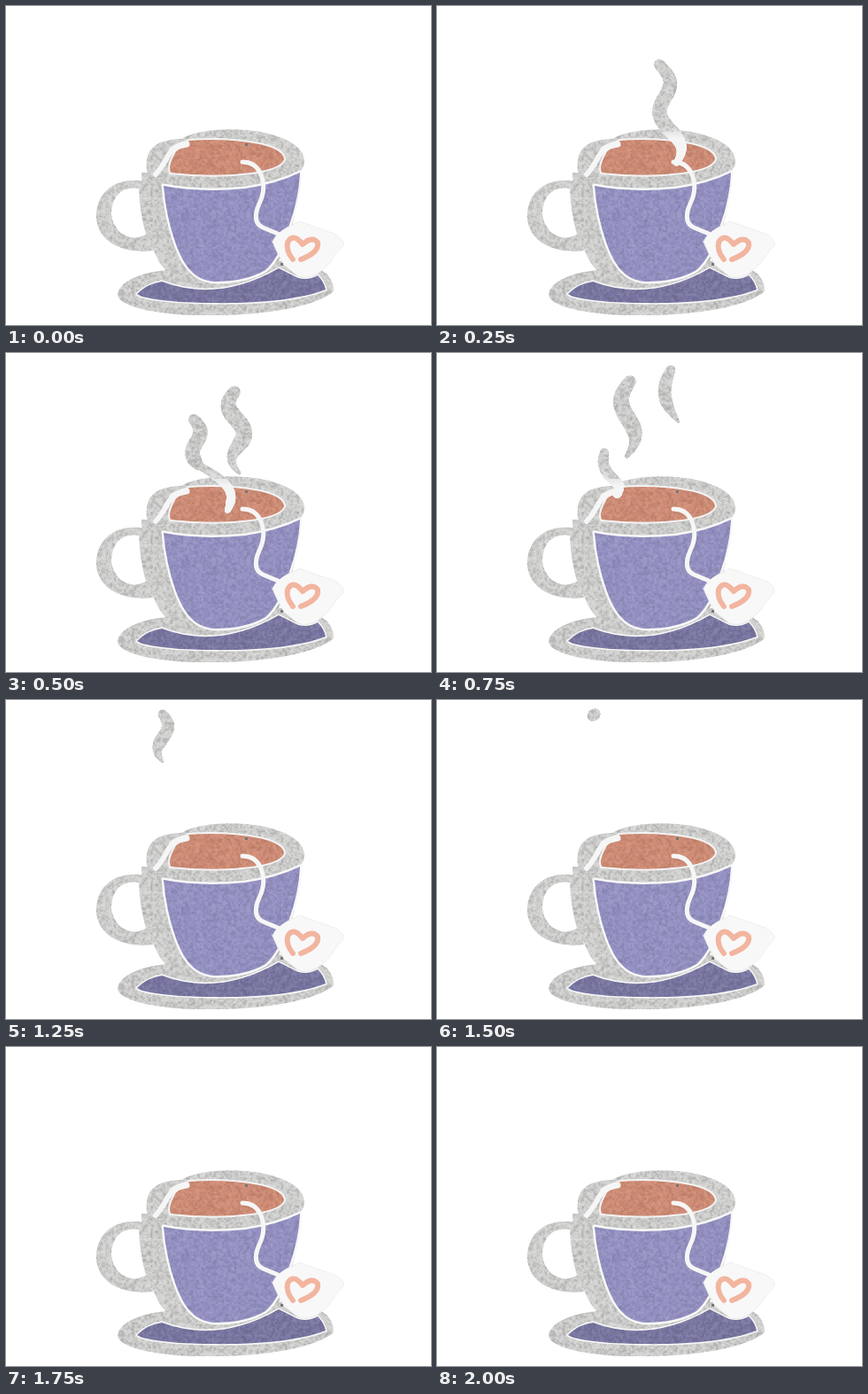
Write an HTML page with a canvas that moves like this. It is 480 px wide and 360 px high and loops after 2500 ms.

```html
<!DOCTYPE html>
<html>
<head>
<meta charset="utf-8">
<title>Cup of tea</title>
<style>
html, body { margin: 0; width: 100%; height: 100%; overflow: hidden; background: #fff; }
canvas { display: block; }
</style>
</head>
<body>
<canvas id="stage" width="480" height="360"></canvas>
<script>
const W = 480, H = 360, STEP = 250, LOOP = 2500;
const GREY = '#d5d5d4';
const stage = document.getElementById('stage').getContext('2d');

function makeLayer() {
  const c = document.createElement('canvas');
  c.width = W;
  c.height = H;
  return c.getContext('2d');
}

// Seeded light and dark specks for the paper texture
const noise = makeLayer();
{
  const img = noise.createImageData(W, H);
  let seed = 7;
  for (let i = 0; i < img.data.length; i += 4) {
    seed = (seed * 1664525 + 1013904223) >>> 0;
    const n = seed / 2 ** 31 - 1;
    img.data.fill(n > 0 ? 255 : 0, i, i + 3);
    img.data[i + 3] = Math.abs(n) * 255;
  }
  noise.putImageData(img, 0, 0);
}

function grain(g, strength, height = H) {
  g.save();
  g.beginPath();
  g.rect(0, 0, W, height);
  g.clip();
  g.globalCompositeOperation = 'source-atop';
  for (const scale of [1, 2.3]) {
    g.globalAlpha = strength * (scale > 1 ? 1 : 0.5);
    g.drawImage(noise.canvas, 0, 0, W * scale, H * scale);
  }
  g.restore();
}

function fill(g, d, color) {
  g.fillStyle = color;
  g.fill(new Path2D(d), 'evenodd');
}

function line(g, d, color, width) {
  g.lineCap = g.lineJoin = 'round';
  g.strokeStyle = color;
  g.lineWidth = width;
  g.stroke(new Path2D(d));
}

const saucer = 'M126 326C128 310 153 301 180 298L310 288Q352 292 363 303Q371 313 370 322C350 340 285 350 230 349C180 350 128 341 126 326Z';
const saucerTop = 'M148 325Q160 313 176 311Q240 335 308 296L330 307Q342 310 352 304Q359 311 361 320C330 332 280 336 230 335C195 335 155 331 148 325Z';
const handle = 'M160 198C125 192 102 208 102 238C103 265 130 280 166 276Z' +
  'M150 206C130 203 120 215 119 234C120 252 135 264 150 261L158 258Q151 232 150 206Z';
const body = 'M153 188C155 230 161 285 184 301C202 318 222 323 240 322C280 320 302 305 313 278Q328 245 333 185Z';
const rim = 'M159 186C157 165 164 151 198 150C215 140 245 138 272 140C306 143 337 156 337 175C337 198 290 206 250 208C215 209 170 206 159 186Z';
const front = 'M178 203Q220 211 270 206Q305 201 332 188Q331 217 319 250Q309 284 293 298Q271 311 235 311C212 309 201 293 192 269Q181 239 178 203Z';
const tea = 'M206 152Q250 149 286 156C306 160 314 167 314 173C311 183 286 188 256 190Q220 192 186 188Q183 182 189 170Q192 160 206 157Z';
const tag = 'M301 266Q306 254 326 246L331 243Q350 250 371 257Q383 264 381 270Q371 280 365 291L352 302Q340 309 330 305L314 292Q306 279 301 266Z';

const cup = makeLayer();
for (const shape of [saucer, handle, body, rim]) fill(cup, shape, GREY);
grain(cup, 0.17);
line(cup, saucerTop, '#f8f8f8', 3);
line(cup, front, '#f8f8f8', 5);
line(cup, tea, '#f4f4f4', 4);
line(cup, 'M204 155Q189 158 183 169Q177 181 169 190', '#f6f6f6', 6);

const paint = makeLayer();
fill(paint, saucerTop, '#7775a2');
fill(paint, front, '#9491c5');
fill(paint, tea, '#d28b73');
grain(paint, 0.1);
cup.drawImage(paint.canvas, 0, 0);

line(cup, 'M188 162Q195 157 204 156', '#f6f6f6', 7);
fill(cup, tag, '#f8f8f8');
line(cup, tag, '#eee', 1);
line(cup, 'M267 176Q281 176 287 188Q295 205 286 223Q277 244 290 250L307 257', '#f6f6f6', 5);
line(cup, 'M324 286Q316 276 318 267Q324 255 335 269Q346 259 352 267Q354 278 333 286', '#f2b59f', 6);
fill(cup, 'M310 290h3v3h-3ZM270 155h3v3h-3Z', '#777');

// A wavy stroke from head to tail: sway in px, number of half waves, radius, tail thickness
function wisp(g, color, x0, y0, x1, y1, sway, waves, radius, tail) {
  g.fillStyle = color;
  for (let u = 0; u <= 1; u += 0.005) {
    const x = x0 + (x1 - x0) * u + sway * Math.sin(Math.PI * waves * u);
    const y = y0 + (y1 - y0) * u;
    g.beginPath();
    g.arc(x, y, radius * Math.min(0.75 + u, 1, tail + 2 * (1 - u)), 0, 7);
    g.fill();
  }
}

function picture(i) {
  const g = makeLayer();
  const tone = g.createLinearGradient(0, 132, 0, 150);
  tone.addColorStop(0, GREY);
  tone.addColorStop(1, '#f5f5f5');
  const puff = (...shape) => wisp(g, tone, ...shape);
  const shine = (...shape) => wisp(g, '#f3f3f3', ...shape);
  if (i === 1) {
    puff(251, 66, 270, 178, 9, 3, 8, 0.4);
  } else if (i === 2) {
    puff(258, 44, 264, 136, -8, 3, 9, 0.2);
    puff(212, 75, 218, 127, 6, 2, 8, 0.7);
    puff(218, 127, 250, 178, 17, 1, 5, 0.6);
  } else if (i === 3) {
    puff(264, 19, 273, 78, -11, 1, 7, 0.2);
    puff(218, 32, 214, 117, -9, 2, 9, 0.25);
    puff(189, 112, 207, 150, -8, 1, 6, 0.8);
    puff(207, 150, 203, 160, 0, 1, 5, 0.7);
  } else if (i === 4) {
    puff(254, 16, 249, 50, 18, 1, 8, 0.25);
    puff(207, 16, 218, 58, 11, 1.5, 9, 0.2);
    puff(175, 17, 186, 124, 8, 3, 8, 0.25);
    shine(213, 18, 213, 41, 4, 1, 6, 0.5);
    shine(181, 45, 177, 74, -4, 1, 5, 0.7);
  } else if (i === 5) {
    puff(177, 16, 177, 70, 6, 2, 7, 0.2);
  } else if (i === 6) {
    puff(179, 15, 176, 18, 0, 1, 6, 0.9);
  }
  grain(g, 0.17, 142);
  const out = makeLayer();
  out.drawImage(cup.canvas, 0, 0);
  out.drawImage(g.canvas, 0, 0);
  return out.canvas;
}

const pictures = Array.from({ length: LOOP / STEP }, (_, i) => picture(i));
const start = performance.now();

function draw() {
  const t = (performance.now() - start) % LOOP;
  stage.clearRect(0, 0, W, H);
  stage.drawImage(pictures[Math.floor(t / STEP)], 0, 0);
  requestAnimationFrame(draw);
}
draw();
</script>
</body>
</html>
```
